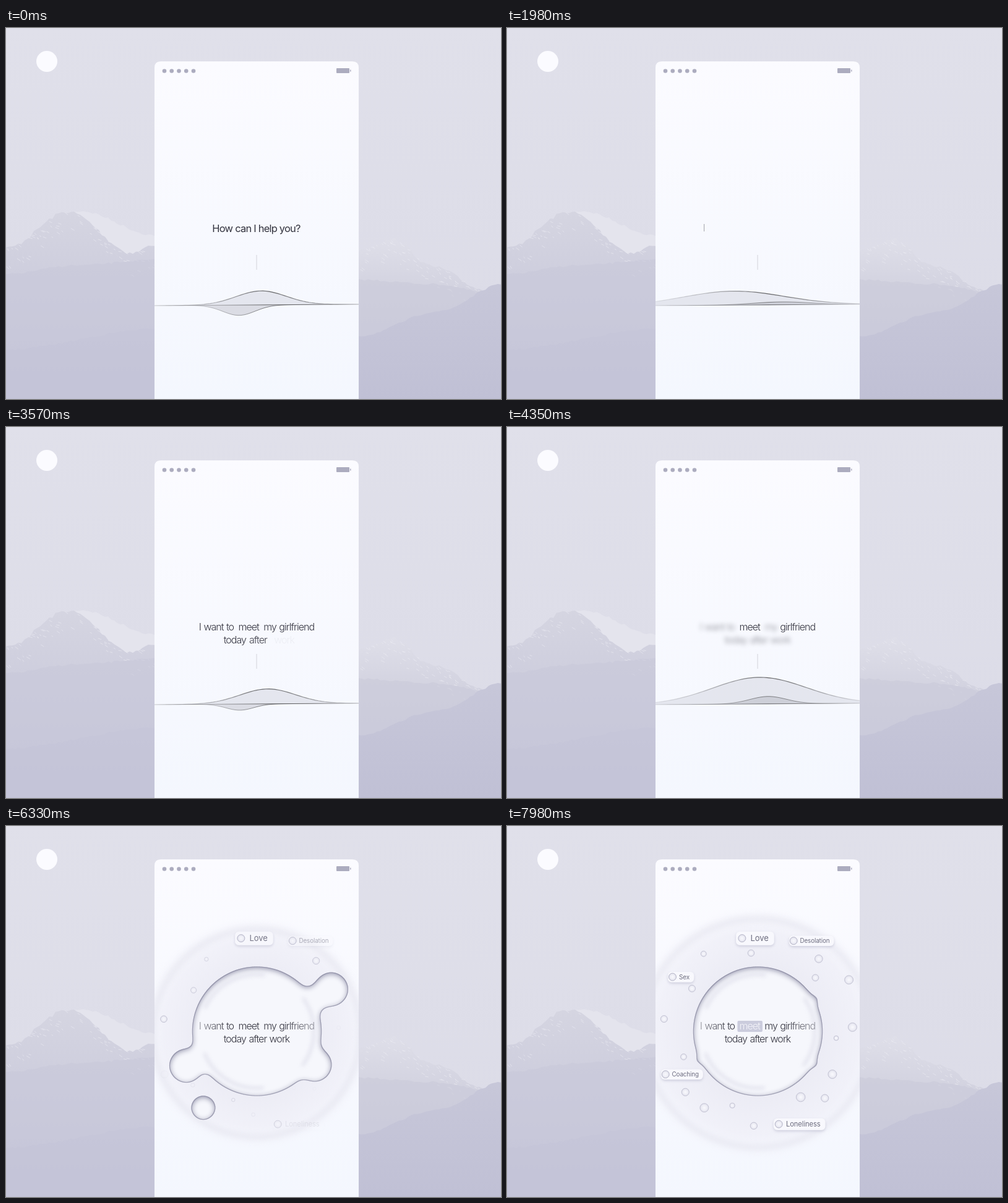
Write an HTML page that moves like this. It is 800 px wide and 600 px high and loops after 8 s.

```html
<!DOCTYPE html>
<html lang="en">
<head>
<meta charset="utf-8">
<style>
  html, body { margin: 0; width: 100%; height: 100%; overflow: hidden; background: #e0e0ea; }
  svg { display: block; width: 100vw; height: 100vh; }
  text { font-family: Inter, Roboto, sans-serif; fill: #33333e; }
  .question { font-size: 16.5px; letter-spacing: -.8px; }
  .word { font-size: 16px; font-weight: 350; letter-spacing: -.95px; fill: url(#wordInk); }
  .tag text { fill: #6c6c7e; letter-spacing: -.1px; }
</style>
</head>
<body>
<svg viewBox="0 0 800 600">
  <defs>
    <linearGradient id="sky" x2="0" y2="1">
      <stop stop-color="#e0e0ea"/><stop offset="1" stop-color="#dbdbe7"/>
    </linearGradient>
    <linearGradient id="farHill" x2="0" y2="1">
      <stop stop-color="#d5d5e1"/><stop offset=".5" stop-color="#cbcbdc"/><stop offset="1" stop-color="#c0c0d4"/>
    </linearGradient>
    <linearGradient id="snowHill" x2="0" y2="1">
      <stop stop-color="#dfdfe9"/><stop offset=".3" stop-color="#d3d3e0"/><stop offset="1" stop-color="#c4c4d7"/>
    </linearGradient>
    <linearGradient id="nearHill" x2="0" y2="1">
      <stop stop-color="#c7c7d9"/><stop offset="1" stop-color="#c0c0d5"/>
    </linearGradient>
    <linearGradient id="screen" x2="0" y2="1">
      <stop stop-color="#fbfbff"/><stop offset="1" stop-color="#f4f7fe"/>
    </linearGradient>
    <linearGradient id="ink" gradientUnits="userSpaceOnUse" x1="240" x2="570">
      <stop stop-color="#555" stop-opacity=".1"/><stop offset=".3" stop-color="#444" stop-opacity=".4"/>
      <stop offset=".55" stop-color="#333" stop-opacity=".75"/><stop offset=".75" stop-color="#444" stop-opacity=".55"/>
      <stop offset="1" stop-color="#555" stop-opacity=".15"/>
    </linearGradient>
    <radialGradient id="wordInk" gradientUnits="userSpaceOnUse" cx="405" cy="340" r="98">
      <stop offset=".5" stop-color="#33333e"/><stop offset="1" stop-color="#33333e" id="wordEdge"/>
    </radialGradient>
    <radialGradient id="haze">
      <stop offset=".45" stop-color="#ebebf4"/><stop offset=".8" stop-color="#f0f0f8" stop-opacity=".9"/>
      <stop offset="1" stop-color="#f3f3fa" stop-opacity="0"/>
    </radialGradient>
    <radialGradient id="pearl">
      <stop stop-color="#f9f9fd"/><stop offset=".65" stop-color="#ededf5"/><stop offset="1" stop-color="#dcdce8"/>
    </radialGradient>
    <filter id="goo" filterUnits="userSpaceOnUse" x="230" y="110" width="350" height="470" color-interpolation-filters="sRGB">
      <feGaussianBlur in="SourceAlpha" stdDeviation="8"/>
      <feColorMatrix values="0 0 0 0 .965  0 0 0 0 .968  0 0 0 0 .99  0 0 0 20 -9.5" result="body"/>
      <feMorphology in="body" operator="erode" radius="1.3" result="inner"/>
      <feFlood flood-color="#8c8ca3" flood-opacity=".75"/>
      <feComposite in2="body" operator="in"/>
      <feComposite in2="inner" operator="out"/>
      <feGaussianBlur stdDeviation=".6" result="edge"/>
      <feGaussianBlur in="body" stdDeviation="5"/>
      <feOffset dy="2" result="soft"/>
      <feFlood flood-color="#8686a0"/>
      <feComposite in2="body" operator="in"/>
      <feComposite in2="soft" operator="out" result="shade"/>
      <feMerge><feMergeNode in="body"/><feMergeNode in="shade"/><feMergeNode in="edge"/></feMerge>
    </filter>
    <filter id="lift" x="-20%" y="-50%" width="140%" height="220%">
      <feDropShadow dx="0" dy="2" stdDeviation="2" flood-color="#9a9ab5" flood-opacity=".4"/>
    </filter>
    <clipPath id="phone"><path id="phoneShape" d="M240 600V64q0-10 10-10H560q10 0 10 10V600z"/></clipPath>
  </defs>

  <rect width="800" height="600" fill="url(#sky)"/>
  <g id="hills"></g>
  <circle cx="66" cy="54" r="17" fill="#fbfbff"/>
  <use href="#phoneShape" fill="url(#screen)"/>
  <g id="status" fill="#acacbf">
    <rect x="534" y="65" width="21" height="8" rx="1"/><rect x="556" y="67.5" width="1.5" height="3"/>
  </g>

  <g clip-path="url(#phone)">
    <g id="halo">
      <circle id="hazeDisc" cx="405" cy="335" fill="url(#haze)"/>
      <circle id="ring" cx="405" cy="335" fill="none" stroke="#e2e2ec" stroke-width="9" style="filter:blur(5px)" opacity=".6"/>
    </g>
    <path id="tick" d="M405 367V391" stroke="#d2d2d9"/>
    <g id="wave">
      <path id="upperFill" fill="#9c9cae" fill-opacity=".2"/>
      <path id="lowerFill" fill="#8a8a98" fill-opacity=".26"/>
      <g fill="none" stroke="url(#ink)">
        <path id="upperLine" stroke-width="1.2"/><path id="lowerLine" stroke-width=".8"/><path id="baseLine"/>
      </g>
    </g>
    <g id="dust" fill="#50505e"></g>
    <g id="beads" fill="url(#pearl)" stroke="#bcbccd" stroke-width=".8"></g>
    <g id="drop">
      <g id="blob" filter="url(#goo)"></g>
      <circle cx="405.5" cy="332" r="92" fill="none" stroke="#d6d6e4" stroke-width="5" stroke-dasharray="120 73"
        stroke-dashoffset="60" opacity=".6" style="filter:blur(3px)"/>
    </g>
    <g id="tags"></g>
  </g>

  <text class="question" id="question" x="404.5" y="330" text-anchor="middle">How can I help you?</text>
  <rect id="mark" y="315" height="18" rx="2" fill="#cbccdd"/>
  <g id="words"></g>
</svg>

<script>
const $ = id => document.getElementById(id);
const LOOP = 8000, TAU = Math.PI * 2;
const CX = 405.5, CY = 332, RADIUS = 105;

function set(el, attrs) {
  for (const key in attrs) el.setAttribute(key, attrs[key]);
  return el;
}
function add(parent, name, attrs = {}, content = '') {
  const el = set(document.createElementNS('http://www.w3.org/2000/svg', name), attrs);
  el.textContent = content;
  return parent.appendChild(el);
}

let seed = 7;
const random = () => (seed = seed * 16807 % 2147483647) / 2147483647;
const mix = (a, b, p) => a + (b - a) * p;
const ramp = (t, start, length) => {
  const p = Math.min(1, Math.max(0, (t - start) / length));
  return p * p * (3 - 2 * p);
};
const around = (degrees, distance) => ({
  cx: CX + distance * Math.cos(degrees * TAU / 360),
  cy: CY + distance * Math.sin(degrees * TAU / 360)
});
function soften(el, opacity, blur) {
  el.style.opacity = opacity;
  el.style.filter = blur > .05 ? `blur(${blur}px)` : 'none';
}

// A rough ridge through a few key points, with optional snow flecks below it
function ridge(fill, points, rough, flecks = 0) {
  const heightAt = x => {
    const i = Math.max(1, points.findIndex(p => p[0] >= x));
    const [a, b] = [points[i - 1], points[i]];
    return mix(a[1], b[1], ramp(x, a[0], b[0] - a[0]));
  };
  const start = points[0][0], end = points.at(-1)[0];
  let d = `M${start} 600`;
  for (let x = start; x <= end; x += 5) d += `L${x} ${heightAt(x) + (random() - .5) * rough}`;
  add($('hills'), 'path', { d: d + `L${end} 600z`, fill });
  for (let i = 0; i < flecks; i++) {
    const x = mix(start, end, random()), y = heightAt(x) + 1 + random() ** 2 * 35;
    add($('hills'), 'path', { d: `M${x} ${y}l${2 + random() * 4} ${1 + random() * 3}`, stroke: '#ececf3', opacity: .6 });
  }
}
ridge('#e4e4ed', [[80, 305], [120, 296], [240, 335]], 4);
ridge('url(#farHill)', [[0, 356], [100, 297], [205, 364], [240, 350]], 6, 70);
ridge('url(#snowHill)', [[570, 358], [625, 342], [690, 386], [775, 424], [800, 430]], 6, 90);
ridge('#c9c9daa0', [[0, 398], [110, 384], [240, 375]], 3);
ridge('#cacadba0', [[570, 407], [690, 414], [800, 432]], 3);
ridge('url(#nearHill)', [[570, 498], [700, 458], [800, 415]], 3);
ridge('#c2c2d670', [[0, 520], [240, 487]], 3);

for (let i = 0; i < 5; i++) add($('status'), 'circle', { cx: 256 + i * 11.75, cy: 69.5, r: 3.3 });

// Two bumps on a resting line; every measure swings with the same period
function drawWave(t) {
  const phase = (t - 1080) / 3270 * TAU;
  const swing = (rest, c, s) => rest + c * Math.cos(phase) + s * Math.sin(phase);
  const restAt = x => 449 - (x - 240) / 150;
  const bump = (height, centre, width) => {
    const dots = [];
    for (let x = 240; x <= 570; x += 5) {
      dots.push(`${x} ${(restAt(x) + height * Math.exp(-(((x - centre) / width) ** 2))).toFixed(2)}`);
    }
    return 'M' + dots.join('L');
  };
  const rise = swing(29.5, 7.5, 0) + 6 * Math.cos(2 * phase);
  const upper = bump(-rise, swing(395, 13, -27), swing(90, 17, 28));
  const lower = bump(swing(2, -14, -9), swing(412, 10, 35), swing(48, -6, 16));
  const close = `L570 ${restAt(570)}L240 ${restAt(240)}z`;
  set($('upperFill'), { d: upper + close });
  set($('lowerFill'), { d: lower + close });
  set($('upperLine'), { d: upper });
  set($('lowerLine'), { d: lower });
  set($('baseLine'), { d: `M240 ${restAt(240)}L570 ${restAt(570)}` });
  const gone = ramp(t, 4900, 620);
  soften($('wave'), 1 - gone, gone * 2.5);
  $('tick').style.opacity = 1 - ramp(t, 4700, 500);
}

for (let i = 0; i < 140; i++) {
  const x = 400 + (random() + random() + random() - 1.5) * 160;
  const y = 438 - 24 * Math.exp(-(((x - 385) / 75) ** 2)) - random() ** 1.5 * 24;
  add($('dust'), 'circle', { cx: x, cy: y, r: .45 + .5 * random() ** 8, opacity: .4 });
}
function drawDust(t) {
  $('dust').style.opacity = ramp(t, 2250, 350) * (1 - ramp(t, 2950, 550));
  $('dust').setAttribute('transform', `translate(0 ${(2790 - t) * .012})`);
}

// Spoken words, laid out in centred lines; starred words stay sharp
const words = [];
['I want to *meet my *girlfriend', 'today after work'].forEach((line, row) => {
  const items = line.split(' ').map(token => {
    const key = token[0] === '*', label = token.replace('*', '');
    const el = add($('words'), 'text', { class: 'word', y: 329 + row * 21 }, label);
    return { el, key, label, pad: label === 'meet' ? 3 : 0, width: el.getComputedTextLength() };
  });
  const gap = 4.3;
  const total = items.reduce((sum, w) => sum + w.width + w.pad * 2 + gap, -gap);
  let x = 405 - total / 2;
  for (const w of items) {
    w.x = x + w.pad;
    x += w.width + w.pad * 2 + gap;
    w.start = 1850 + words.length * 210;
    words.push(w);
  }
});
const marked = words.find(w => w.label === 'meet');
set($('mark'), { x: marked.x - 3, width: marked.width + 7 });

function drawText(t) {
  const out = ramp(t, 1480, 370);
  soften($('question'), 1 - out, out * 4);
  const dim = ramp(t, 4000, 280) * (1 - ramp(t, 4580, 370));
  for (const w of words) {
    const p = ramp(t, w.start, 300), d = w.key ? 0 : dim;
    w.el.setAttribute('x', w.x + 8 * (1 - p));
    soften(w.el, p * (1 - .45 * d), 3.6 * d);
  }
  const light = ramp(t, 6950, 400);
  $('mark').style.opacity = light;
  marked.el.style.fill = `color-mix(in srgb, #f4f4f9 ${light * 100}%, #33333e)`;
  $('wordEdge').setAttribute('stop-opacity', 1 - .55 * ramp(t, 5500, 800));
}

// Droplet: lobes swell out of it, then shrink into beads
const addBead = (angle, reach, size, start) => ({ angle, reach, size, start, el: add($('beads'), 'circle') });
add($('blob'), 'circle', { cx: CX, cy: CY, r: RADIUS });
const lobes = [[154, 127], [-29.5, 138], [30, 108], [125, 151]].map(([angle, reach]) => {
  const attached = reach < RADIUS + 40;
  return {
    angle, reach, size: attached ? 28.5 : 21, drift: attached ? 31 : 0,
    neck: attached ? 1.45 : 0,
    line: add($('blob'), 'path', { stroke: '#000' }), el: add($('blob'), 'circle')
  };
});
const beads = lobes.map(l => addBead(l.angle, l.reach + l.drift, 7, 6500));
for (let i = 0; i < 7; i++) {
  addRing(127, 5 + i * 52);
  addRing(153, -50 + i * 47.5);
}
function addRing(reach, angle) {
  beads.push(addBead(angle, reach, 3.5 + random() * 4, 5500 + random() * 800));
}
function drawDrop(t) {
  const shown = ramp(t, 4850, 1000);
  soften($('drop'), shown, 5 * (1 - shown));
  const grow = ramp(t, 5600, 730), leave = ramp(t, 6330, 820);
  for (const l of lobes) {
    const at = around(l.angle, mix(RADIUS - 30, l.reach, grow) + l.drift * leave);
    const r = l.size * mix(.5, 1, grow) * (1 - .85 * leave);
    set(l.el, { ...at, r });
    set(l.line, { d: `M${CX} ${CY}L${at.cx} ${at.cy}`, 'stroke-width': r * l.neck });
  }
  for (const b of beads) {
    const p = ramp(t, b.start, 900);
    set(b.el, { ...around(b.angle, b.reach * mix(.85, 1, p)), r: b.size * mix(.4, 1, p), opacity: p });
  }
  const spread = ramp(t, 4900, 2000);
  $('halo').style.opacity = ramp(t, 4950, 1100);
  $('hazeDisc').setAttribute('r', mix(120, 205, spread));
  $('ring').setAttribute('r', mix(98, 185, spread));
}

// Tags in order of arrival: label, text position, font size
const tags = [
  ['Love', 393.5, 186, 13], ['Desolation', 473.5, 189, 9.8], ['Loneliness', 451, 486, 11.2],
  ['Coaching', 266.5, 405, 9.8], ['Sex', 278, 247.5, 10]
].map(([label, x, y, size], order) => {
  const el = add($('tags'), 'g', { class: 'tag' });
  const pill = add(el, 'rect', { fill: '#f8f8fd', filter: 'url(#lift)', rx: 6 });
  const text = add(el, 'text', { x, y, 'font-size': size }, label);
  const left = x - size * 1.8, height = size * 1.7;
  set(pill, { x: left, y: y - size * 1.18, width: text.getComputedTextLength() + size * 2.5, height });
  add(el, 'circle', { cx: left + size * .75, cy: y - size * .34, r: 6, fill: 'url(#pearl)', stroke: '#b6b6c8' });
  return { el, pill, text, start: 5850 + order * 150 };
});
function drawTags(t) {
  for (const { el, pill, text, start } of tags) {
    const p = ramp(t, start, 550);
    el.style.opacity = Math.sqrt(p);
    text.style.opacity = p;
    pill.style.opacity = p * p;
  }
}

function frame() {
  const t = performance.now() % LOOP;
  for (const draw of [drawWave, drawDust, drawText, drawDrop, drawTags]) draw(t);
  requestAnimationFrame(frame);
}
frame();
</script>
</body>
</html>
```
